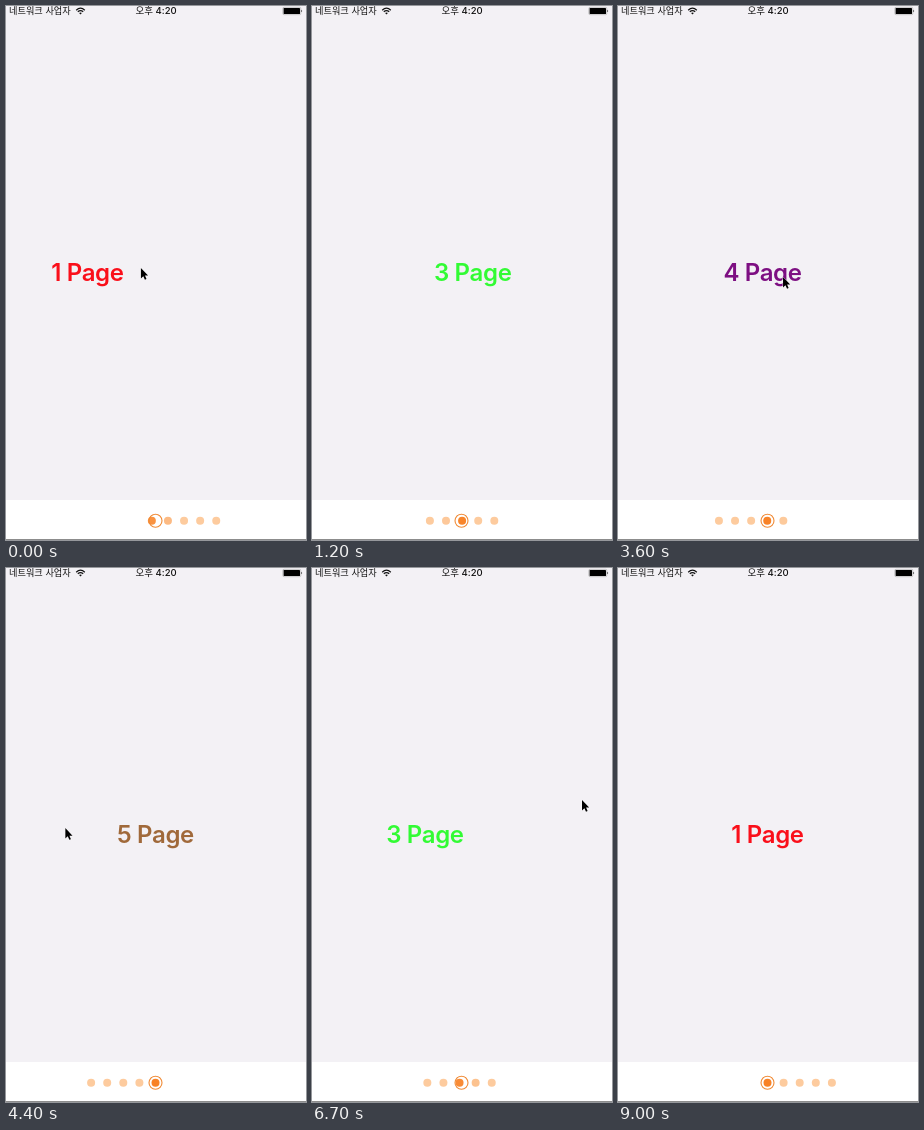
An HTML page for the animation above (9.1 s loop, 300x534 px).

```html
<!DOCTYPE html>
<html lang="ko">
<head>
<meta charset="utf-8">
<title>Pager</title>
<style>
  html, body { margin: 0; width: 100%; height: 100%; overflow: hidden; background: #f3f1f5; }
  svg { display: block; width: 300px; height: 534px; }
  .status { font: 300 9.2px "Noto Sans CJK KR", "Noto Sans CJK", sans-serif; fill: #111; }
  .clock { font: 500 9.5px Inter, "Noto Sans CJK KR", "Noto Sans CJK", sans-serif; fill: #111; }
  #pages { font: 600 24px Inter, Roboto, sans-serif; letter-spacing: -.35px; text-anchor: middle; }
</style>
</head>
<body>
<svg viewBox="0 0 300 534">
  <rect width="300" height="534" fill="#f3f1f5"/>
  <text class="status" x="3" y="8">네트워크 사업자</text>
  <g fill="none" stroke="#111" stroke-width="1.2">
    <path d="M70.2 4.2Q74.5 .2 78.8 4.2M71.8 5.8Q74.5 3.4 77.2 5.8"/>
    <path d="M74.5 8.4L73.1 7Q74.5 5.9 75.9 7Z" fill="#111" stroke="none"/>
  </g>
  <text class="clock" x="129.5" y="8">오후 4:20</text>
  <rect x="276.8" y="1.3" width="18" height="7.4" rx="1.2" fill="none" stroke="#999" stroke-width=".5"/>
  <rect x="277.6" y="2" width="16.4" height="6" rx=".6"/>
  <path d="M295.4 3.7Q297 5 295.4 6.3Z"/>

  <g id="pages"></g>

  <rect y="494" width="300" height="40" fill="#fff"/>
  <rect y="533" width="300" height="1" fill="#8c8c8c"/>
  <g id="dots"></g>
  <circle cx="149.5" cy="514.7" r="6.5" fill="none" stroke="#f08a35" stroke-width="1.1"/>

  <path id="cursor" d="M0 0V10.4L2.4 8.2L4 11.8L5.6 11.1L4.1 7.6H7.2Z"
        stroke="#fff" stroke-width=".8" paint-order="stroke"/>
</svg>
<script>
const LOOP = 9100, STEP = 100, PAGE_W = 300, DOT_GAP = 16.1, CENTER = 149.5;
const HOLD = 300, LEAD = 200, RETURN = 1000;
const colors = ["#fa0f1a", "#1a2fe8", "#32fb34", "#7d0f82", "#a0693a"];

// each swipe: time, pointer x when it grabs and lets go, pointer y
const swipes = [
  { at: 0, from: 203, to: 20, y: 262 },
  { at: 800, from: 203, to: -20, y: 265 },
  { at: 2205, from: 270, to: 47, y: 257 },
  { at: 3673, from: 170, to: 30, y: 271 },
  { at: 5579, from: 105, to: 270, y: 243 },
  { at: 6470, from: 105, to: 270, y: 232 },
  { at: 7300, from: 105, to: 270, y: 237 },
  { at: 8300, from: 105, to: 310, y: 242 }
];

function add(parent, tag, attrs) {
  const el = document.createElementNS("http://www.w3.org/2000/svg", tag);
  for (const k in attrs) el.setAttribute(k, attrs[k]);
  return document.getElementById(parent).appendChild(el);
}

const labels = colors.map((fill, i) => {
  const el = add("pages", "text", { y: 274.8, fill });
  el.textContent = `${i + 1} Page`;
  return el;
});
const dots = colors.map(() => add("dots", "circle", { cy: 514.7, r: 4 }));
const cursor = document.getElementById("cursor");

const lerp = (a, b, k) => a + (b - a) * k;
const clamp = k => Math.min(1, Math.max(0, k));
const smooth = k => k * k * (3 - 2 * k);

// speeding drag, then exponential settling onto the page
function progress(swipe, t) {
  const n = (t - swipe.at) / STEP;
  if (n < 0) return .227 * clamp(n + 1) ** 2;
  if (n < 1) return lerp(.227, .7, n);
  return n >= 6 ? 1 : 1 - .3 * .5 ** (n - 1);
}

function pagePosition(t) {
  return swipes.reduce((sum, s) => sum + Math.sign(s.from - s.to) * progress(s, t), 0);
}

// the pointer drags with the page, lets go, then glides to the next grab
function pointer(t) {
  const i = swipes.findLastIndex(s => s.at - STEP <= t);
  const s = swipes[i], next = swipes[i + 1];
  const reach = Math.min(PAGE_W * progress(s, t), Math.abs(s.to - s.from));
  const x = s.from + Math.sign(s.to - s.from) * reach;
  if (!next) return [x, s.y];
  const span = Math.min(RETURN, next.at - s.at - HOLD - LEAD);
  const k = smooth(clamp((t - s.at - HOLD) / span));
  return [lerp(x, next.from, k), lerp(s.y, next.y, k)];
}

function dotColor(k) {
  const mix = (a, b) => Math.round(lerp(a, b, k));
  return `rgb(${mix(253, 248)},${mix(203, 130)},${mix(158, 38)})`;
}

function draw(t) {
  const pos = pagePosition(t);
  labels.forEach((el, i) => el.setAttribute("x", CENTER + (i - pos) * PAGE_W));
  dots.forEach((el, i) => {
    el.setAttribute("cx", CENTER + (i - pos) * DOT_GAP);
    el.setAttribute("fill", dotColor(clamp(1 - Math.abs(i - pos))));
  });
  cursor.setAttribute("transform", `translate(${pointer(t)})`);
}

const begin = performance.now();
function tick() {
  const t = (performance.now() - begin) % LOOP;
  draw(Math.floor(t / STEP) * STEP);
  requestAnimationFrame(tick);
}
tick();
</script>
</body>
</html>
```
